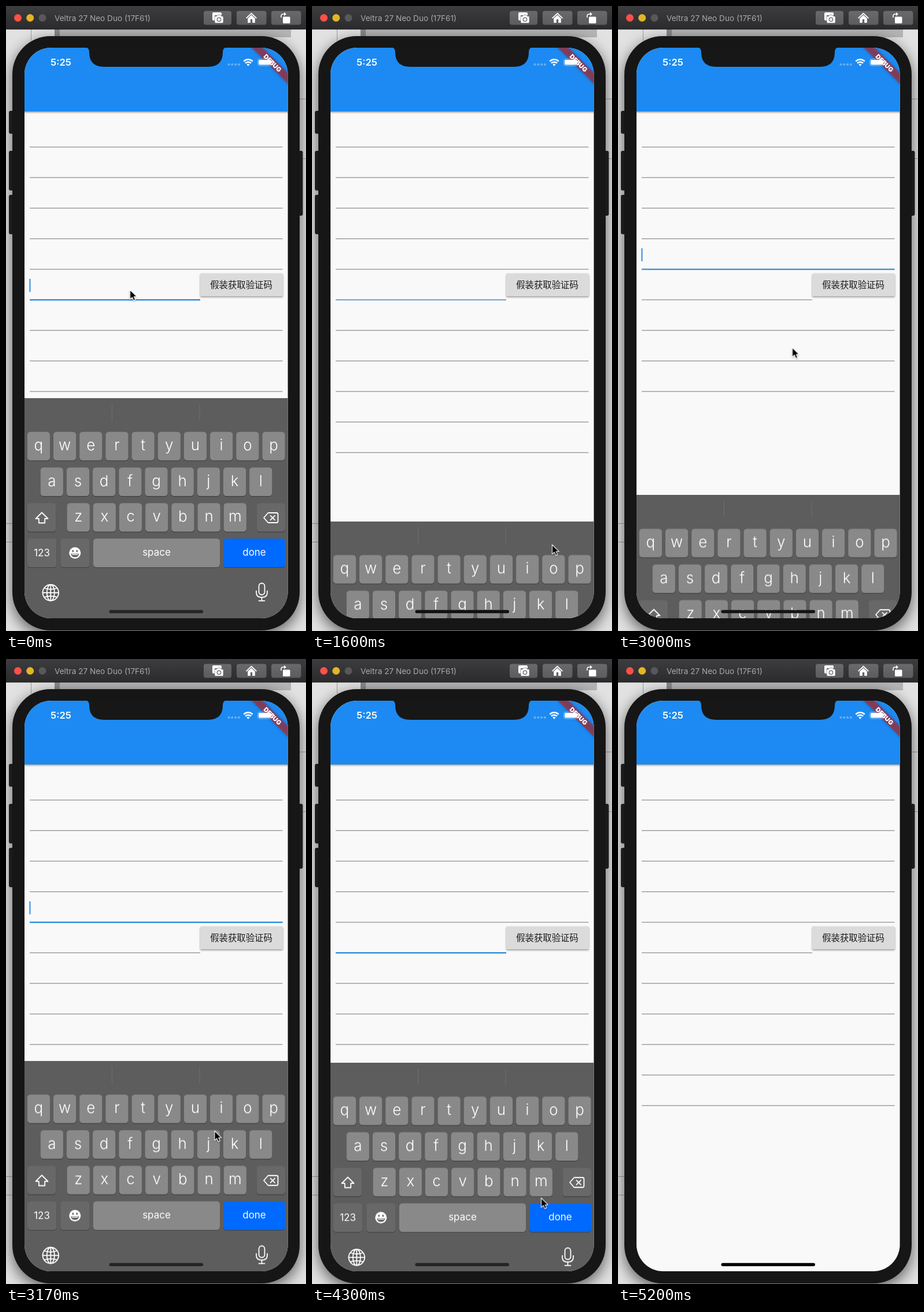
An HTML page for the animation above (5.71 s loop, 519 px wide and 1079 px high).

```html
<!DOCTYPE html>
<html lang="zh">
<head>
<meta charset="utf-8">
<title>Form focus demo</title>
<style>
  html, body { margin: 0; width: 100%; height: 100%; overflow: hidden; background: #dcdcdc; }
  svg { display: block; width: 519px; height: 1079px; font-family: Inter, Roboto, sans-serif; }
  text { fill: #fff; }
  .mid { text-anchor: middle; }
  .key { font-size: 26px; font-weight: 300; }
  .label { font-size: 17px; }
  .line { fill: none; stroke: #fff; stroke-width: 1.8; stroke-linecap: round; stroke-linejoin: round; }
  .cjk { font: 500 15.4px "Noto Sans CJK SC", "Noto Sans CJK", sans-serif; fill: #1c1c1c; }
</style>
</head>
<body>
<svg id="stage" viewBox="0 0 519 1079">
  <defs>
    <linearGradient id="bar" x2="0" y2="1">
      <stop offset="0" stop-color="#3d3d40"/><stop offset="1" stop-color="#2b2b2d"/>
    </linearGradient>
    <linearGradient id="btn" x2="0" y2="1">
      <stop offset="0" stop-color="#6a6a6d"/><stop offset="1" stop-color="#5c5c5f"/>
    </linearGradient>
    <filter id="deep" x="-20%" y="-10%" width="140%" height="120%">
      <feDropShadow dx="0" dy="8" stdDeviation="13" flood-opacity=".6"/>
    </filter>
    <filter id="low" x="-10%" y="-30%" width="120%" height="180%">
      <feDropShadow dx="0" dy="1.8" stdDeviation="1.6" flood-opacity=".38"/>
    </filter>
    <filter id="soft" x="-20%" y="-80%" width="140%" height="260%">
      <feDropShadow dx="0" dy="0" stdDeviation="2.4" flood-opacity=".5"/>
    </filter>
    <filter id="tip" x="-40%" y="-30%" width="190%" height="180%">
      <feDropShadow dx="0" dy="1.2" stdDeviation="1" flood-opacity=".35"/>
    </filter>
    <clipPath id="screen"><rect x="32" y="72" width="455.6" height="985" rx="46"/></clipPath>
  </defs>

  <!-- desktop -->
  <rect width="519" height="1079" fill="#e2e2e2"/>
  <rect x="93" y="40" width="400" height="14" fill="#b4b4b4"/>
  <rect x="84" y="40" width="9" height="14" fill="#888"/>
  <path d="M43.5 40V60M0 893.5H12M0 925.5H12M508 160.5H519M508 263.5H519" stroke="#9d9d9d"/>

  <!-- phone body -->
  <g fill="#242424">
    <rect x="5" y="181" width="12" height="39.500" rx="3"/>
    <rect x="5" y="250" width="12" height="68.500" rx="3"/>
    <rect x="5" y="326" width="12" height="68" rx="3"/>
    <rect x="500" y="250" width="13.500" height="112" rx="3"/>
  </g>
  <rect x="11" y="52" width="497" height="1026" rx="66" fill="#171717" filter="url(#deep)"/>

  <!-- window bar -->
  <rect width="519" height="40" fill="url(#bar)"/>
  <rect y="39.500" width="519" height="1" fill="#141414"/>
  <circle cx="20.500" cy="20.500" r="6.500" fill="#ff5048"/>
  <circle cx="41.700" cy="20.500" r="6.500" fill="#e2b526"/>
  <circle cx="63" cy="20.500" r="6.500" fill="#58585b"/>
  <text x="84" y="25.500" font-size="13.600" style="fill:#a9a9ac">Veltra 27 Neo Duo (17F61)</text>
  <g fill="url(#btn)">
    <rect x="342" y="8.500" width="48" height="24" rx="4"/>
    <rect x="399" y="8.500" width="51.500" height="24" rx="4"/>
    <rect x="459" y="8.500" width="51.500" height="24" rx="4"/>
  </g>
  <g fill="#fff">
    <path d="M357 13q0-2 2-2h12q2 0 2 2v3H361v9h-2q-2 0-2-2z"/>
    <path d="M361 19.500q0-2 2-2h1.500l1.500-2h5l1.500 2h1.500q2 0 2 2v8q0 2-2 2h-11q-2 0-2-2z" stroke="#636366" stroke-width=".6"/>
    <circle cx="368.500" cy="23.300" r="3.200" fill="none" stroke="#636366" stroke-width="1.300"/>
    <path d="M424.500 11.500L434 20.500l-1.200 1.300L424.500 14l-8.300 7.800L415 20.500z"/>
    <path d="M424.500 15.500l6.300 6V29h-12.600v-7.500z"/>
    <rect x="422.800" y="23" width="3.400" height="6" fill="#636366"/>
    <rect x="479" y="18.500" width="12.500" height="11.500" rx="1.500"/>
    <path d="M480.500 11l-5 0" stroke="none"/>
    <path d="M476 20v-2.500q0-3.500 3.500-3.500h2" fill="none" stroke="#fff" stroke-width="1.600"/>
    <path d="M481 10.800l4 3.200-4 3.200z"/>
  </g>

  <!-- app -->
  <g clip-path="url(#screen)">
    <rect x="32" y="72" width="456" height="985" fill="#f9f9f9"/>
    <g id="rows"></g>
    <rect x="336" y="461.500" width="143" height="39.600" rx="2.200" fill="#dbdbdb" filter="url(#low)"/>
    <text x="407" y="487" class="mid cjk">假装获取验证码</text>
    <rect x="26" y="60" width="468" height="122" fill="#1f8af2" filter="url(#low)"/>
    <g transform="translate(487.6 72) scale(1.1) rotate(45)">
      <rect x="-46" y="28" width="92" height="12" fill="#b71c1c" fill-opacity=".58" filter="url(#soft)"/>
      <text class="mid" y="37.700" font-size="10" font-weight="900">DEBUG</text>
    </g>
    <path d="M137 71q7 1 7 9q0 25 26 25h179q26 0 26-25q0-8 7-9z" fill="#171717"/>
    <text x="95" y="103.300" class="mid" font-size="16.600" font-weight="600">5:25</text>
    <g fill="#fff" fill-opacity=".32" id="dots"></g>
    <g fill="none" stroke="#fff" stroke-width="2.500">
      <path d="M411.300 95.500a11 11 0 0 1 15.400 0M414 98.700a7.200 7.200 0 0 1 10 0"/>
      <path d="M419 103.800l-2.600-2.900a3.800 3.800 0 0 1 5.200 0z" fill="#fff" stroke="none"/>
    </g>
    <rect x="435.500" y="91.500" width="25" height="11.600" rx="3.300" fill="none" stroke="#fff" stroke-opacity=".45"/>
    <rect x="437" y="93" width="22" height="8.600" rx="2" fill="#fff"/>
    <path d="M462 95.200q1.800.6 1.800 2.100t-1.800 2.100z" fill="#fff" fill-opacity=".5"/>

    <g id="board">
      <rect x="32" y="677" width="456" height="390" fill="#5d5d5d"/>
      <path d="M183.500 687.500V716M335 687.500V716" stroke="#6f6f6f"/>
      <g id="keys"></g>
      <path class="line" d="M62 874.500l10.500 10.500h-5.300v7.500h-10.400V885H51.500z" stroke-width="1.600"/>
      <path class="line" d="M453.500 875h14.500q2.500 0 2.500 2.500v12q0 2.500-2.500 2.500h-14.500l-7.500-8.500zM457.500 879.800l7.500 7.500M465 879.800l-7.500 7.500"/>
      <circle cx="119.300" cy="944.300" r="10" fill="#fff"/>
      <g fill="#5f5f5f">
        <ellipse cx="115.800" cy="941" rx="1.300" ry="2"/><ellipse cx="122.800" cy="941" rx="1.300" ry="2"/>
        <path d="M112.300 945.500h14q-.5 6-7 6t-7-6z"/>
      </g>
      <path d="M114 947h10.600" stroke="#fff" stroke-width="1.400"/>
      <g class="line">
        <circle cx="77.300" cy="1012.800" r="13.800"/>
        <ellipse cx="77.300" cy="1012.800" rx="6.600" ry="13.800"/>
        <path d="M77.300 999v27.600M63.500 1012.800h27.600M66.500 1005q10.800 4 21.600 0M66.500 1020.600q10.800-4 21.600 0"/>
        <rect x="437.500" y="996.500" width="10" height="20" rx="5"/>
        <path d="M433 1010v2.500q0 8.500 9.500 8.500t9.500-8.500V1010M442.500 1021v5.500M437.500 1026.800h10"/>
      </g>
    </g>
    <rect id="home" x="178.500" y="1042.800" width="162.500" height="5.400" rx="2.700"/>
  </g>

  <g id="mouse">
    <path d="M0 0V16.300L3.800 12.800L6.300 18.600L9.300 17.300L6.900 11.700H11.700Z" fill="#000" stroke="#fff" stroke-width="1.100" stroke-linejoin="round" filter="url(#tip)"/>
  </g>
</svg>
<script>
const LOOP = 5710;
const $ = id => document.getElementById(id);

function add(parent, tag, attrs, text) {
  const el = document.createElementNS('http://www.w3.org/2000/svg', tag);
  for (const k in attrs) el.setAttribute(k, attrs[k]);
  if (text) el.textContent = text;
  parent.append(el);
  return el;
}

// steps: [ms, value, easing towards the next step]
function play(el, prop, steps) {
  const frames = steps.map(([ms, value, easing = 'linear']) =>
    ({ offset: ms / LOOP, [prop]: value, easing }));
  const first = steps[0], last = steps[steps.length - 1];
  if (first[0] > 0) frames.unshift({ offset: 0, [prop]: first[1] });
  if (last[0] < LOOP) frames.push({ offset: 1, [prop]: last[1] });
  el.animate(frames, { duration: LOOP, iterations: Infinity }).startTime = 0;
}

// form rows
const rows = $('rows');
const rowY = i => 243.5 + 52.75 * i;
const rowW = i => i === 5 ? 295 : 437.500;
const hiddenRows = add(rows, 'g', {});
for (let i = 0; i < 11; i++)
  add(i > 8 ? hiddenRows : rows, 'rect',
    { x: 41, y: rowY(i) - .7, width: rowW(i), height: 1.4, fill: '#999' });

const focusLine = i => add(rows, 'rect',
  { x: 41, y: rowY(i) - 1, width: rowW(i), height: 2.2, fill: '#2188dd' });
const caret = i => add(rows, 'rect',
  { x: 40.3, y: rowY(i) - 36.2, width: 2.2, height: 22.5, fill: '#3b94ea' });

for (let i = 0; i < 4; i++) add($('dots'), 'circle', { cx: 385.5 + i * 5.8, cy: 101, r: 2.1 });

// keyboard
function key(x, y, w, label, fill, cls, base) {
  const g = $('keys');
  add(g, 'rect', { x, y: y + 1.2, width: w, height: 49.3, rx: 5.2, fill: '#404040' });
  add(g, 'rect', { x, y, width: w, height: 49.3, rx: 5.2, fill });
  if (label) add(g, 'text', { x: x + w / 2, y: y + base, class: 'mid ' + cls }, label);
}
[['qwertyuiop', 36.8], ['asdfghjkl', 59.7], ['zxcvbnm', 105.6]].forEach(([letters, x], r) =>
  [...letters].forEach((c, i) =>
    key(x + i * 45.18, 735.2 + r * 61.5, 39.2, c, '#898989', 'key', 32)));
const dim = '#686868';
key(36.8, 858.2, 49.5, '', dim);
key(433.500, 858.2, 49.5, '', dim);
key(36.8, 919.6, 50.5, '123', dim, 'label', 30.500);
key(94.2, 919.6, 50.5, '', dim);
key(151, 919.6, 219, 'space', '#898989', 'label', 29.500);
key(376, 919.6, 107, 'done', '#006aff', 'label', 29.500);

// timeline
const HIDE1 = 1486, SHOW = 2886, NEXT = 3800, HIDE2 = 4287;
const spring = 'cubic-bezier(.38,.7,.125,1)';
const material = 'cubic-bezier(.4,0,.2,1)';

const slide = (up, down) => [
  [0, up], [HIDE1, up, spring], [HIDE1 + 500, down],
  [SHOW, down, spring], [SHOW + 500, up],
  [HIDE2, up, spring], [HIDE2 + 500, down]];
play($('board'), 'transform', slide('translateY(0px)', 'translateY(380px)'));
play($('home'), 'fill', slide('#262626', '#000000'));

play(hiddenRows, 'opacity', [
  [0, 0], [HIDE1, 0], [HIDE1, 1], [SHOW, 1], [SHOW, 0], [HIDE2, 0], [HIDE2, 1]]);

play(focusLine(5), 'opacity', [
  [0, 1], [HIDE1 + 34, 1, material], [HIDE1 + 234, 0],
  [NEXT, 0, material], [NEXT + 200, 1],
  [HIDE2 + 20, 1, material], [HIDE2 + 220, 0]]);
play(focusLine(4), 'opacity', [
  [SHOW, 0, material], [SHOW + 200, 1], [NEXT, 1, material], [NEXT + 200, 0]]);

play(caret(5), 'opacity', [
  [0, 1], [300, 1, 'ease-out'], [550, 0], [800, 0, 'ease-out'], [1050, 1],
  [HIDE1, 1], [HIDE1, 0], [NEXT, 0], [NEXT, 1], [HIDE2, 1], [HIDE2, 0]]);
play(caret(4), 'opacity', [
  [SHOW, 0], [SHOW, 1], [3560, 1, 'ease-out'], [NEXT, 0]]);

const at = (ms, x, y, easing) => [ms, `translate(${x}px, ${y}px)`, easing];
play($('mouse'), 'transform', [
  at(0, 214.5, 490), at(30, 214.5, 490, 'ease-in-out'),
  at(600, 408, 926, 'ease-out'), at(1170, 415.5, 930),
  at(2030, 415.5, 930, 'ease-in'), at(2370, 202, 521, 'ease-out'),
  at(2500, 150, 462, 'ease-in-out'), at(2610, 179, 449, 'ease-out'),
  at(2730, 179.5, 439), at(2870, 179.5, 439, 'ease-in'),
  at(3000, 301, 588, 'ease-out'), at(3330, 386, 910, 'ease-out'),
  at(3530, 389.5, 919, 'ease-in-out'), at(4070, 396.5, 930.5),
  at(4720, 396.5, 930.5, 'ease-in-out'), at(5180, 440, -26)]);
</script>
</body>
</html>
```
